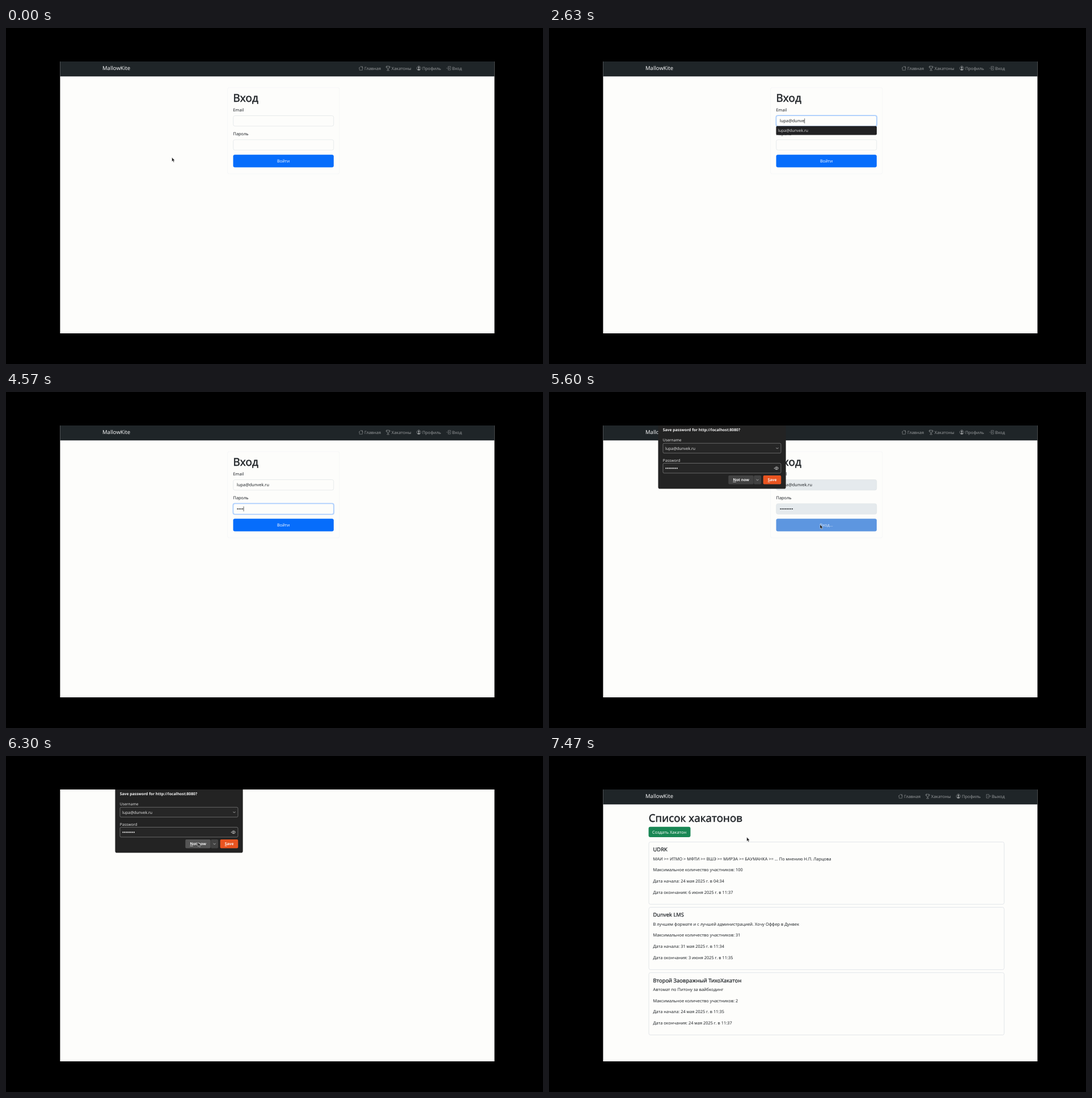
Recreate the animation shown at these times as an HTML page. Size 947 by 592 pixels, loop 7730 ms.

```html
<!DOCTYPE html>
<html lang="ru">
<head>
<meta charset="utf-8">
<title>Вход</title>
<style>
  html, body { margin: 0; width: 100%; height: 100%; overflow: hidden; background: #000; }
  svg { display: block; width: 947px; height: 592px; }
  text { font-family: "Noto Sans", "Open Sans", sans-serif; text-rendering: geometricPrecision; white-space: pre; }
  .u { text-decoration: underline; }
  .medium { stroke: #212529; stroke-width: .025em; }
  .line { fill: none; stroke-linecap: round; stroke-linejoin: round; }
</style>
</head>
<body>
<svg id="stage" viewBox="0 0 947 592"></svg>
<script>
const LOOP = 7730;
const EMAIL = 'lupa@dunvek.ru';
const INK = '#212529', MUTED = '#96999b', PAPER = '#fdfdfb';

// Text is placed by its left edge and the middle of its capitals.
const text = (x, y, str, { size = 7.4, fill = INK, attrs = '' } = {}) =>
  `<text x="${x}" y="${(y + size * 0.36).toFixed(2)}" font-size="${size}" fill="${fill}" ${attrs}>${str}</text>`;

const heading = (x, y, str, size) => text(x, y, str, { size, attrs: 'class="medium"' });

const box = (x, y, w, h, fill, { r = 3, stroke = 'none', attrs = '' } = {}) =>
  `<rect x="${x}" y="${y}" width="${w}" height="${h}" rx="${r}" fill="${fill}" stroke="${stroke}" stroke-width=".7" ${attrs}/>`;

const group = (id, body) => `<g id="${id}">${body}</g>`;

const dots = (id, x, y, step, fill) => group(id,
  Array.from({ length: 8 }, (_, i) => `<circle cx="${x + i * step}" cy="${y}" r="1.05" fill="${fill}"/>`).join(''));

// Icons are drawn on a 16-unit grid and shown at half size.
const ICONS = {
  home: 'M1 8 8 1.2 15 8M2.8 6.5V14.5H13.2V6.5M11.5 4V2H13V5.8',
  cup: 'M4 1H12C12 6 11 9.5 8 10.5C5 9.5 4 6 4 1ZM4 2.5H1C1 6 2.5 7.5 5 8M12 2.5H15C15 6 13.5 7.5 11 8M8 10.5V13M4.5 15.2C5 13.6 6 13 8 13S11 13.6 11.5 15.2Z',
  user: 'M8 .8A7.2 7.2 0 1 1 7.99 .8Z',
  enter: 'M6 4V2H14.5V14H6V12M1 8H10.5M7.5 5 10.5 8 7.5 11',
  leave: 'M10 4V2H1.5V14H10V12M5.5 8H15M12 5 15 8 12 11'
};
const icon = (name, x) =>
  `<g transform="translate(${x} 66.7) scale(.52)"><path class="line" stroke="${MUTED}" stroke-width="1.1" d="${ICONS[name]}"/>` +
  (name === 'user' ? `<circle cx="8" cy="6" r="3" fill="${MUTED}"/><path d="M3 13C4 10.5 6 10 8 10S12 10.5 13 13Q8 17 3 13Z" fill="${MUTED}"/>` : '') + '</g>';

const nav = (shift, lastIcon, lastText) => {
  const item = (name, x, label) => icon(name, x) + text(x + 10.2, 71.2, label, { fill: MUTED });
  return box(95.4, 59, 766, 26.3, '#1f2528', { r: 0 }) +
    text(170, 71, 'MallowKite', { size: 9.5, fill: '#f4f5f6' }) +
    item('home', 621.8 - shift, 'Главная') +
    item('cup', 669.6 - shift, 'Хакатоны') +
    item('user', 723.8 - shift, 'Профиль') +
    item(lastIcon, 776.6 - shift, lastText);
};

const field = (id, y) =>
  box(399.5, y - 1.2, 179.6, 20.8, '#b9d7fd', { r: 4, attrs: `id="${id}Ring"` }) +
  box(400.8, y, 177, 18.4, PAPER, { stroke: '#dee2e6', attrs: `id="${id}Box"` });

const login =
  nav(0, 'enter', 'Вход') +
  box(390.5, 105, 197.5, 152, PAPER, { stroke: '#f3f4f5' }) +
  heading(400.4, 123, 'Вход', 19) +
  text(400.5, 144.6, 'Email') +
  field('email', 154.5) +
  text(407, 163.6, '', { attrs: 'id="emailText"' }) +
  text(400.5, 186.8, 'Пароль') +
  field('pass', 196.8) +
  dots('passDots', 408.4, 206, 2.95, INK) +
  '<path id="caret" stroke="#212529" stroke-width=".7"/>' +
  box(400.6, 223.2, 177.3, 22.3, '#066dfb', { attrs: 'id="submit"' }) +
  text(489.2, 234.4, 'Войти', { fill: '#f4f8ff', attrs: 'id="submitText" text-anchor="middle"' }) +
  group('hint', box(400.5, 172.8, 177.5, 15.8, '#212123', { r: 2 }) +
    text(404, 180.9, EMAIL, { size: 6.9, fill: '#dcdcdc' }));

const cards = [
  ['UDRK', 'МАИ >= ИТМО > МФТИ >= ВШЭ >= МИРЭА >= БАУМАНКА >= ... По мнению Н.П. Ларцова', 100,
    '24 мая 2025 г. в 04:34', '6 июня 2025 г. в 11:37'],
  ['Dunvek LMS', 'В лучшем формате и с лучшей администрацией. Хочу Оффер в Дунвек', 31,
    '31 мая 2025 г. в 11:34', '3 июня 2025 г. в 11:35'],
  ['Второй Заовражный ТихоХакатон', 'Автомат по Питону за вайбкодинг', 2,
    '24 мая 2025 г. в 11:35', '24 мая 2025 г. в 11:37']
].map(([title, about, limit, from, to], i) => {
  const y = 151.5 + i * 115.1;
  const rows = [about, `Максимальное количество участников: ${limit}`, `Дата начала: ${from}`, `Дата окончания: ${to}`];
  return box(176, y, 626.7, 109.8, 'none', { stroke: '#d9dde2' }) +
    heading(183.5, y + 13.5, title, 9.4) +
    rows.map((row, k) => text(183.5, y + 29.5 + k * 19.65, row.replace(/>/g, '&gt;'))).join('');
}).join('');

const list =
  nav(6, 'leave', 'Выход') +
  heading(175.8, 109, 'Список хакатонов', 18.7) +
  box(175.6, 124.8, 73.9, 18.3, '#198754') +
  text(182, 134, 'Создать Хакатон', { fill: '#f4fbf7' }) +
  cards;

const dark = { size: 6.75, fill: '#e4e4e4' };
const bold = { size: 6.75, fill: '#f6f6f6', attrs: 'font-weight="700"' };
const chevron = (x, y) => `<path class="line" stroke="#d0d0d0" stroke-width=".8" d="M${x - 1.7} ${y - .8}l1.7 1.7 1.7-1.7"/>`;
const popup =
  '<path d="M192.5 59H417.7V167.5Q417.7 170.6 414.7 170.6H195.5Q192.5 170.6 192.5 167.5Z" fill="#232323"/>' +
  text(200.8, 66.2, 'Save password for http://localhost:8080?', bold) +
  text(200.8, 85, 'Username', dark) +
  box(201, 90.3, 208, 17.4, '#262626', { r: 2, stroke: '#858585' }) +
  text(205, 99.2, EMAIL, { ...dark, size: 6.9 }) + chevron(402.5, 99.2) +
  text(200.8, 120.2, 'Password', dark) +
  box(201, 125.5, 208, 17.4, '#262626', { r: 2, stroke: '#858585' }) +
  dots('savedDots', 206.3, 134.4, 2.8, '#e4e4e4') +
  '<path class="line" stroke="#d0d0d0" stroke-width=".8" d="M397.4 134.3Q401.2 129.2 405 134.3Q401.2 139.4 397.4 134.3Z"/>' +
  '<circle cx="401.2" cy="134.3" r="1.3" fill="none" stroke="#d0d0d0" stroke-width=".8"/>' +
  box(316.3, 147, 44.4, 15.4, '#424242', { r: 2, attrs: 'id="notNow"' }) +
  box(361.2, 147, 13, 15.4, '#424242', { r: 2 }) + chevron(367.6, 155) +
  text(324.4, 154.8, '<tspan class="u">N</tspan>ot now', bold) +
  box(377.7, 147, 31.6, 15.4, '#e95420', { r: 2 }) +
  text(385.8, 154.8, '<tspan class="u">S</tspan>ave', bold);

const stage = document.getElementById('stage');
stage.innerHTML =
  '<rect width="947" height="592"/>' +
  box(95.4, 59, 766, 479, PAPER, { r: 0 }) +
  group('login', login) + group('list', list) + group('popup', popup) +
  '<path id="arrow" d="M0 0V7.3L1.7 5.8 2.8 8.5 4.1 8 2.9 5.4H5.1Z" fill="#1a1a1a" stroke="#fff" stroke-width=".45"/>' +
  '<path id="beam" class="line" stroke="#222" stroke-width=".7" d="M-1.3-3.6Q0-3.6 0-2.8Q0-3.6 1.3-3.6M0-2.8V2.8M-1.3 3.6Q0 3.6 0 2.8Q0 3.6 1.3 3.6"/>';

const el = id => document.getElementById(id);
const show = (id, on) => { el(id).style.display = on ? '' : 'none'; };
const set = (id, attrs) => { for (const k in attrs) el(id).setAttribute(k, attrs[k]); };
const between = (t, a, b) => t >= a && t < b;
const count = (times, t) => times.filter(v => v <= t).length;
const clamp = v => Math.min(1, Math.max(0, v));
const ease = v => v * v * (3 - 2 * v);

const EMAIL_KEYS = [1170, 1250, 1430, 1570, 2170, 2300, 2390, 2470, 2540, 2610, 2730, 2970, 3060, 3140];
const PASS_KEYS = [4370, 4430, 4490, 4550, 4620, 4690, 4760, 4840];
// Pointer path: time, x, y
const PATH = [
  [370, 292.6, 228], [1030, 452, 164], [3500, 452, 164], [4120, 458, 206],
  [5200, 458, 206], [5430, 478, 233.5], [5680, 478, 233.5], [6240, 338.5, 152],
  [6960, 338.5, 152], [7440, 348.8, 143]
];

function pointer(t) {
  const i = PATH.findIndex(p => p[0] > t);
  if (i === 0) return PATH[0].slice(1);
  if (i < 0) return PATH[PATH.length - 1].slice(1);
  const [a, ax, ay] = PATH[i - 1], [b, bx, by] = PATH[i];
  const k = ease((t - a) / (b - a));
  return [ax + (bx - ax) * k, ay + (by - ay) * k];
}

function draw(t) {
  const onEmail = between(t, 1050, 4130), onPass = between(t, 4130, 5450);
  const sent = t >= 5470;

  show('login', t < 6010);
  show('list', t >= 6400);

  const typed = EMAIL.slice(0, count(EMAIL_KEYS, t));
  const label = el('emailText');
  if (label.textContent !== typed) label.textContent = typed;
  show('hint', between(t, 1170, 3520));

  const n = count(PASS_KEYS, t);
  [...el('passDots').children].forEach((d, i) => { d.style.display = i < n ? '' : 'none'; });

  for (const [id, on] of [['email', onEmail], ['pass', onPass]]) {
    show(id + 'Ring', on);
    set(id + 'Box', { stroke: on ? '#86b7fe' : '#dee2e6', fill: sent ? '#e5eaed' : PAPER });
  }

  show('caret', onEmail || onPass);
  if (t < 6010) {
    const width = typed ? label.getComputedTextLength() : 0;
    const x = onEmail ? 407.3 + width : 407.3 + n * 2.95;
    set('caret', { d: `M${x} ${onEmail ? 159.4 : 201.7}v8.6` });
  }

  const [x, y] = pointer(t);
  const hover = between(t, 5300, 5470) && y > 223;
  set('submit', { fill: sent ? '#5d96e0' : hover ? '#0b5ed7' : '#066dfb' });
  set('submitText', { fill: sent ? '#d5e3f5' : '#f4f8ff' });
  const caption = sent ? 'Вход...' : 'Войти';
  if (el('submitText').textContent !== caption) el('submitText').textContent = caption;

  const shown = clamp((t - 5490) / 90) * (1 - clamp((t - 6900) / 100));
  show('popup', shown > 0);
  set('popup', { opacity: shown });
  const overNotNow = t > 5900 && between(x, 316, 361) && between(y, 147, 163);
  set('notNow', { fill: overNotNow ? '#555' : '#424242' });

  const hidden = between(t, 1170, 3500) || between(t, 4370, 5200);
  const inField = t < 5470 && between(x, 400, 578) && (between(y, 154, 173) || between(y, 196, 216));
  show('arrow', !hidden && !inField);
  show('beam', !hidden && inField);
  for (const id of ['arrow', 'beam']) set(id, { transform: `translate(${x.toFixed(2)} ${y.toFixed(2)})` });
}

const start = performance.now();
function tick() {
  draw((performance.now() - start) % LOOP);
  requestAnimationFrame(tick);
}
tick();
</script>
</body>
</html>
```
